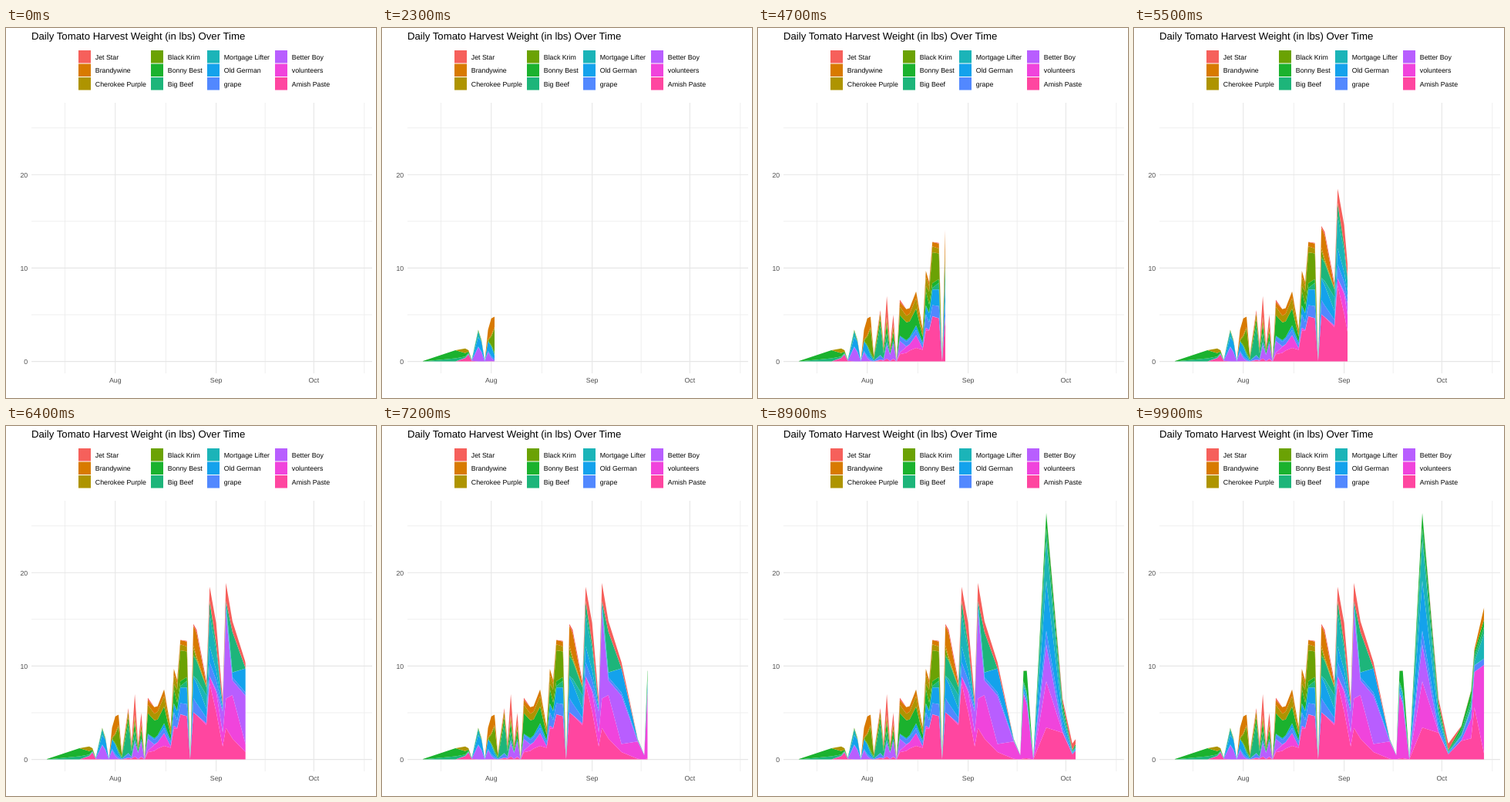
Recreate the animation shown at these times as an HTML page. Size 480 by 480 pixels, loop 10 s.

```html
<!DOCTYPE html>
<html lang="en">
<head>
<meta charset="utf-8">
<title>Daily Tomato Harvest</title>
<style>
  html, body { margin: 0; width: 100%; height: 100%; overflow: hidden; background: #fff; }
  svg { display: block; width: 480px; height: 480px; }
  text { font: 8.8px "Liberation Sans", Arial, sans-serif; text-rendering: geometricPrecision; }
  .title { font-size: 13.2px; }
  .axis { fill: #4d4d4d; }
  .major, .minor { stroke: #e6e6e6; stroke-width: 1.07; }
  .minor { stroke: #ebebeb; stroke-width: .8; }
</style>
</head>
<body>
<svg viewBox="0 0 480 480">
  <defs><clipPath id="reveal"><rect id="window" x="53" y="90" width="0" height="350"/></clipPath></defs>
  <g id="grid"></g>
  <g id="areas" clip-path="url(#reveal)"></g>
  <g id="legend"></g>
  <text class="title" x="33" y="15">Daily Tomato Harvest Weight (in lbs) Over Time</text>
</svg>
<script>
const LAST_DAY = 95, FRAMES = 100, FRAME_MS = 100;
const x = day => 53.1 + 4.2225 * day;
const y = lbs => 432.6 - 12.12 * lbs;

function add(parent, tag, attrs, text) {
  const el = document.createElementNS('http://www.w3.org/2000/svg', tag);
  for (const key in attrs) el.setAttribute(key, attrs[key]);
  if (text) el.textContent = text;
  return document.getElementById(parent).appendChild(el);
}

// Key points of the skyline: [days since the first harvest, total lbs].
const skyline = [
  [0, .05], [10, 1.2], [13, 1.4], [14, 1.2], [15, .2], [17, 3.4], [18, 2.3], [19, .1], [20, 3.4],
  [21, 4.6], [22, 4.8], [23, .7], [25, 5.5], [26, 1.8], [27, 7], [28, 1.7], [29, 5], [30, .1],
  [31, 6.6], [33, 5.6], [34, 5.7], [36, 7.5], [38, 3.5], [39, 9.7], [40, 8.5], [41, 12.8],
  [43, 12.7], [44, .1], [45, 14.5], [46, 13.9], [49, 8.4], [50, 18.5], [52, 14.6], [54, 6.5],
  [55, 18.9], [57, 14.8], [61, 10.4], [66, 2.2], [68, .5], [69, 9.5], [70, 9.5], [72, .2],
  [76, 26.4], [81, 6.5], [84, 1.7], [88, 3.6], [91, 7.4], [92, 11.8], [95, 16.3]
];

// Each variety ripens in a few flushes: [middle day, spread in days, strength].
const varieties = [
  { name: 'Jet Star', color: '#f6605b', flushes: [[28, 2, .3], [55, 7, .1], [84, 2, .4]] },
  { name: 'Brandywine', color: '#d87a00', flushes: [[21, 2, .25], [34, 6, .1], [46, 2, .18], [94, 2, .07]] },
  { name: 'Cherokee Purple', color: '#ae9400', flushes: [[13, 1, .35], [32, 9, .13]] },
  { name: 'Black Krim', color: '#6ba204', flushes: [[22, 1, .4], [42, 2, .3]] },
  { name: 'Bonny Best', color: '#1bb22e', flushes: [[9, 5, .6], [32, 7, .25], [70, 1, .2], [84, 12, .08]] },
  { name: 'Big Beef', color: '#1db57a', flushes: [[9, 4, .25], [25, 2, .3], [47, 4, .12], [57, 1, .28], [84, 12, .07]] },
  { name: 'Mortgage Lifter', color: '#1bb4b8', flushes: [[16, 1, .5], [50, 3, .14], [77, 6, .13], [95, 3, .1]] },
  { name: 'Old German', color: '#14a2ec', flushes: [[18, 3, .4], [44, 9, .11], [61, 3, .2], [78, 7, .18]] },
  { name: 'grape', color: '#5288ff', flushes: [[38, 18, .08], [84, 12, .08]] },
  { name: 'Better Boy', color: '#b85eff', flushes: [[18, 2, .5], [29, 2, .4], [55, 1.5, .5], [61, 3, .3], [76, 3, .11]] },
  { name: 'volunteers', color: '#f044dc', flushes: [[35, 3, .13], [56, 4, .28], [68, 3, .7], [76, 3, .15], [94, 3, .45]] },
  { name: 'Amish Paste', color: '#ff46a0', flushes: [[14, 1, 1], [45, 12, .34], [84, 7, .4], [92, .6, .3]] }
];

function seeded(seed) {
  return () => (seed = (seed * 16807) % 2147483647) / 2147483647;
}

const ripeness = (flushes, day) => flushes.reduce(
  (sum, [middle, spread, strength]) => sum + strength * Math.exp(-(((day - middle) / spread) ** 2)), 0);

// Split every day's total by ripeness, with a little luck in the picking.
function pick() {
  const random = seeded(2020);
  return skyline.map(([day, total]) => {
    const shares = varieties.map(v => ripeness(v.flushes, day) * (.75 + .5 * random()));
    const all = shares.reduce((a, b) => a + b);
    return shares.map(share => total * share / all);
  });
}

function drawGrid() {
  const line = (x1, y1, x2, y2, kind) => add('grid', 'line', { x1, y1, x2, y2, class: kind });
  const column = (px, kind) => line(px, 97, px, 448, kind);
  const row = (lbs, kind) => line(33, y(lbs), 475, y(lbs), kind);
  [76.5, 207.4, 336.2, 464.8].forEach(px => column(px, 'minor'));
  [5, 15, 25].forEach(lbs => row(lbs, 'minor'));
  [['Aug', 21], ['Sep', 52], ['Oct', 82]].forEach(([month, day]) => {
    column(x(day), 'major');
    add('grid', 'text', { x: x(day), y: 460, class: 'axis', 'text-anchor': 'middle' }, month);
  });
  [0, 10, 20].forEach(lbs => {
    row(lbs, 'major');
    add('grid', 'text', { x: 28.2, y: y(lbs) + 3.3, class: 'axis', 'text-anchor': 'end' }, String(lbs));
  });
}

function drawLegend() {
  const columns = [94, 188, 261, 349];
  varieties.forEach(({ name, color }, i) => {
    const left = columns[Math.floor(i / 3)], row = i % 3;
    add('legend', 'rect', { x: left, y: 29 + 17.5 * row, width: 16, height: 16.5, fill: color });
    add('legend', 'text', { x: left + 21.8, y: 41 + 17.3 * row }, name);
  });
}

// Stack from the last variety upwards.
function drawAreas() {
  const picked = pick();
  const edge = sums => sums.map((sum, i) => x(skyline[i][0]).toFixed(2) + ',' + y(sum).toFixed(2));
  let base = skyline.map(() => 0);
  for (let v = varieties.length - 1; v >= 0; v--) {
    const top = base.map((sum, i) => sum + picked[i][v]);
    add('areas', 'polygon', {
      points: [...edge(top), ...edge(base).reverse()].join(' '),
      fill: varieties[v].color
    });
    base = top;
  }
}

drawGrid();
drawLegend();
drawAreas();

// The reveal moves in whole days.
const reveal = document.getElementById('window');
const start = performance.now();
function tick() {
  const frame = Math.floor(Math.max(0, performance.now() - start) / FRAME_MS) % FRAMES;
  const day = Math.round(LAST_DAY * frame / (FRAMES - 1));
  reveal.setAttribute('width', day ? x(day) - 53 : 0);
  requestAnimationFrame(tick);
}
tick();
</script>
</body>
</html>
```
